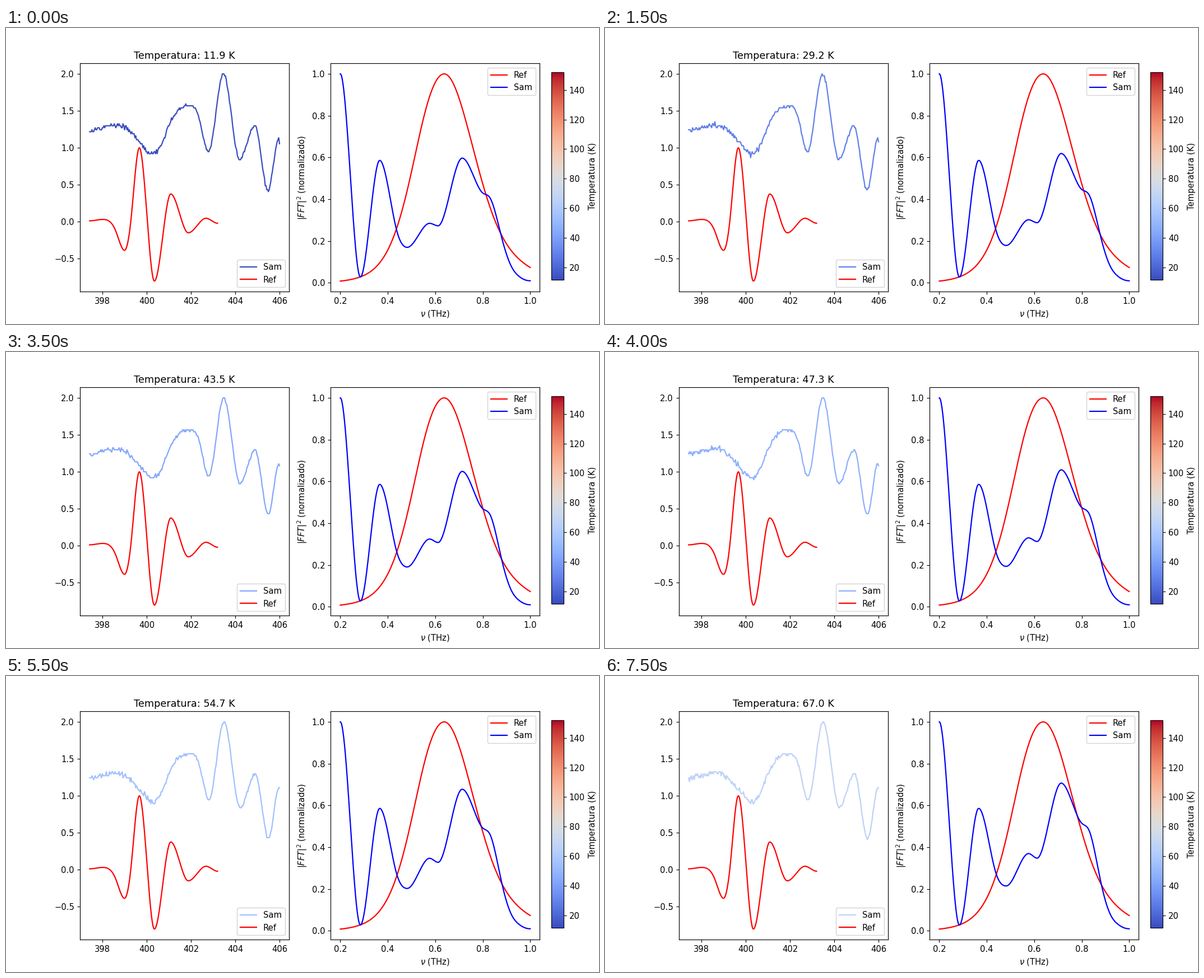
A matplotlib script for the animation above (8000 ms loop, 1058 by 529 pixels).

```python
import numpy as np
import matplotlib.pyplot as plt
from matplotlib.animation import FuncAnimation
from matplotlib.cm import ScalarMappable
from matplotlib.colors import Normalize

FRAMES, INTERVAL = 16, 500
T_MIN, T_MAX = 11.9, 151.8


def curve(points, x, free_ends=False):
    """Smooth curve through points, level wherever they turn around."""
    xk, yk = np.array(points, float).T
    n, h = len(xk), np.diff(xk)
    d = np.diff(yk) / h
    a, b = np.eye(n), np.zeros(n)
    if free_ends:
        b[0], b[-1] = d[0], d[-1]
    for i in range(1, n - 1):
        if d[i - 1] * d[i] > 0:
            l, r = 1 / h[i - 1], 1 / h[i]
            a[i, i - 1:i + 2] = l, 2 * (l + r), r
            b[i] = 3 * (d[i - 1] * l + d[i] * r)
    m = np.linalg.solve(a, b)
    i = np.clip(np.searchsorted(xk, x, side="right") - 1, 0, n - 2)
    t = (x - xk[i]) / h[i]
    s = 1 - t
    return (yk[i] * (1 + 2 * t) * s * s + yk[i + 1] * (3 - 2 * t) * t * t
            + h[i] * (m[i] * t * s * s - m[i + 1] * t * t * s))


# Turning points of both pulses, with a few points in between
REF_PULSE = [(397.415, .012), (398, .031), (398.6, -.13), (398.99, -.387),
             (399.3, .08), (399.66, 1), (400.34, -.803), (401.08, .375),
             (401.87, -.15), (402.67, .047), (403.19, -.02)]
SAM_PULSE = [(397.415, 1.24), (398.6, 1.305), (399.6, 1.11), (400.3, .915),
             (401.1, 1.36), (401.8, 1.56), (402.37, 1.39), (402.78, .945),
             (403.46, 2), (404.19, .84), (404.87, 1.295), (405.47, .42),
             (405.95, 1.11), (405.99, 1.07)]
REF_SPEC = [(.2, .0085), (.3, .036), (.44, .27), (.54, .738), (.638, 1),
            (.8, .474), (.9, .187), (1, .0735)]

# Frequency, height when cold, and change on warming
SAM_SPEC = np.array([
    (.2, 1, 0), (.2845, .028, 0), (.366, .586, 0), (.436, .258, .028),
    (.482, .17, .045), (.576, .285, .085), (.612, .273, .075),
    (.7135, .597, .11), (.8, .43, .085), (.83, .408, .075), (.88, .216, .02),
    (.92, .08, 0), (.95, .034, 0), (1, .01, 0)])

t_sam = np.linspace(397.415, 405.99, 240)
t_ref = np.linspace(397.415, 403.19, 400)
freq = np.linspace(.2, 1, 500)
ref_spec = np.exp(curve([(f, np.log(p)) for f, p in REF_SPEC], freq,
                        free_ends=True))


def temperature(k):
    return np.interp(k, [0, 3, 5, 8, 11, 13, 15],
                     [11.9, 29.2, 36.0, 47.3, 54.7, 61.6, 67.0])


def sam_pulse(k):
    """Pulse that lags slightly on warming, read with a coarse noisy step."""
    rng = np.random.default_rng(40 + k)
    late = np.clip((t_sam - 400.5) / 2, 0, 1)
    y = curve(SAM_PULSE, t_sam - .03 * late * k / (FRAMES - 1))
    y += rng.normal(0, .017, t_sam.size) * (1 - .6 * late)
    y = np.round(y / .027) * .027
    return y + 2 - y.max()


def sam_spec(k):
    f, cold, change = SAM_SPEC.T
    return curve(np.column_stack([f, cold + change * k / (FRAMES - 1)]), freq)


fig, (ax_t, ax_f) = plt.subplots(1, 2, figsize=(10, 5), dpi=105.8)
cmap, norm = plt.get_cmap("coolwarm"), Normalize(T_MIN, T_MAX)

sam_line, = ax_t.plot(t_sam, sam_pulse(0), color=cmap(0.0), label="Sam")
ax_t.plot(t_ref, curve(REF_PULSE, t_ref), color="red", label="Ref")
ax_t.set_xlim(396.986, 406.419)
ax_t.set_ylim(-.943, 2.14)
title = ax_t.set_title("Temperatura: 11.9 K")
legend_t = ax_t.legend(loc="lower right")

ax_f.plot(freq, ref_spec, color="red", label="Ref")
spec_line, = ax_f.plot(freq, sam_spec(0), color="blue", label="Sam")
ax_f.set_xlim(.16, 1.04)
ax_f.set_ylim(-.041, 1.0496)
ax_f.set_xlabel(r"$\nu$ (THz)")
ax_f.set_ylabel(r"$|FFT|^2$ (normalizado)")
ax_f.legend(loc="upper right")

bar = fig.colorbar(ScalarMappable(norm, cmap), ticks=range(20, 141, 20),
                   cax=fig.add_axes([.92, .15, .02, .7]))
bar.set_label("Temperatura (K)")


def update(k):
    temp = temperature(k)
    color = cmap(norm(temp))
    sam_line.set_ydata(sam_pulse(k))
    sam_line.set_color(color)
    legend_t.get_lines()[0].set_color(color)
    title.set_text(f"Temperatura: {temp:.1f} K")
    spec_line.set_ydata(sam_spec(k))
    return sam_line, spec_line, title


anim = FuncAnimation(fig, update, frames=FRAMES, interval=INTERVAL,
                     init_func=lambda: update(0), repeat=True, repeat_delay=0)
plt.show()
```
